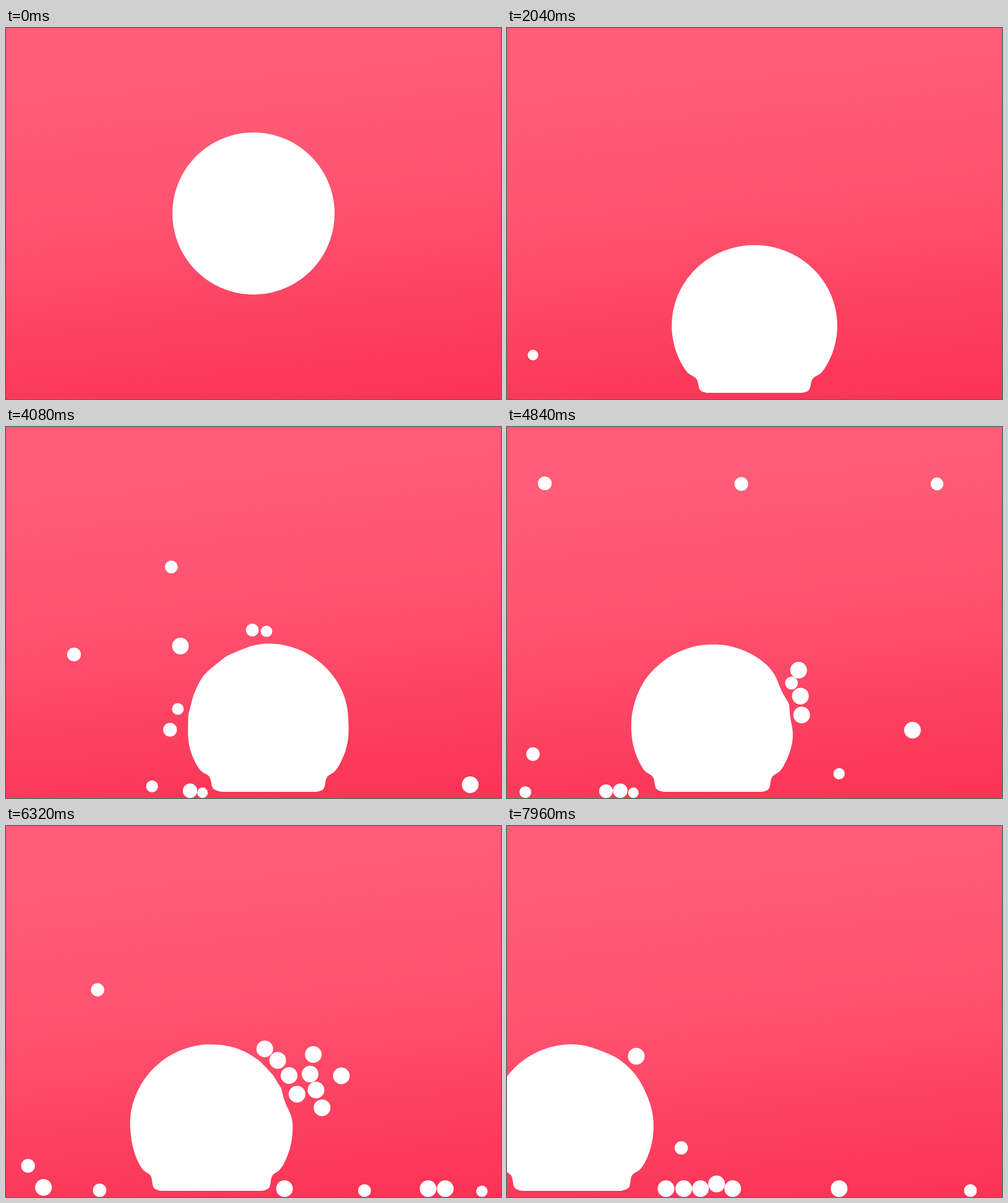
Write an HTML page with a canvas that moves like this. It is 800 px wide and 600 px high and loops after 8000 ms.

```html
<!DOCTYPE html>
<html lang="en">
<head>
<meta charset="utf-8">
<title>Soft blob</title>
<style>
  html, body { margin: 0; height: 100%; overflow: hidden; }
  body { background: linear-gradient(174deg, #ff5d78 14%, #fe5370 48%, #fb3354 98%); }
  canvas { display: block; }
</style>
</head>
<body>
<canvas id="stage" width="800" height="600"></canvas>
<script>
const ctx = document.getElementById('stage').getContext('2d');
const LOOP = 8000, FRAME = 40, STEP = 8, GRAVITY = 0.001;
const FLOOR = 600, REST = 590, LANDING = 564, ROUND = 132;
const SAMPLES = 240, TAU = Math.PI * 2;
const lerp = (a, b, k) => a + (b - a) * k;
const clamp01 = v => Math.max(0, Math.min(1, v));
const bump = (x, width) => Math.exp(-((x / width) ** 2));

let seed = 7;
function random() {
  seed = (seed * 16807) % 2147483647;
  return seed / 2147483647;
}

// Smooth curve through unevenly spaced [x, y] keys.
function curve(keys, x) {
  const last = keys.length - 1;
  if (x <= keys[0][0]) return keys[0][1];
  if (x >= keys[last][0]) return keys[last][1];
  const i = keys.findIndex(k => k[0] > x) - 1;
  const gap = j => keys[j + 1][0] - keys[j][0];
  const rate = j => (keys[j + 1][1] - keys[j][1]) / gap(j);
  const slope = j => j === 0 ? rate(0) : j === last ? rate(last - 1)
    : (rate(j - 1) * gap(j) + rate(j) * gap(j - 1)) / (gap(j) + gap(j - 1));
  const h = gap(i), k = (x - keys[i][0]) / h, k2 = k * k, k3 = k2 * k;
  return (2 * k3 - 3 * k2 + 1) * keys[i][1] + (k3 - 2 * k2 + k) * h * slope(i)
    + (3 * k2 - 2 * k3) * keys[i + 1][1] + (k3 - k2) * h * slope(i + 1);
}

// ---- Blob: a circle that drops, wobbles, drifts and is dented by balls ----
const drift = [[1900, 400], [2040, 400], [2420, 412], [3280, 492], [4840, 332],
  [6320, 332], [7000, 266], [7960, 105]];
const dents = new Float32Array(SAMPLES);

function blobAt(t) {
  const since = Math.max(0, t - LANDING);
  const settle = clamp01(since / 200);
  const sag = 459 + 21 * settle + 5 * clamp01((t - 2040) / 4280);
  return {
    cx: curve(drift, t),
    cy: t < LANDING ? 300 + GRAVITY / 2 * t * t : sag,
    round: lerp(ROUND - 1, ROUND, settle),
    skirt: 5 * settle,
    squash: 0.15 * Math.exp(-since / 700) * Math.sin(since / 99)
  };
}

// Outline radii: circle, rippled next to the floor, minus dents, cut off flat.
function outline({ cy, round, skirt }) {
  const height = REST - cy;
  const corner = Math.asin(Math.min(1, height / round));
  return Array.from(dents, (dent, i) => {
    const sin = Math.sin(i / SAMPLES * TAU);
    const below = Math.asin(sin) - corner;
    const ripple = skirt * (bump(below + 0.09, 0.07) - bump(below + 0.24, 0.08));
    const r = round + ripple - dent;
    return sin > 0 ? Math.min(r, height / sin) : r;
  });
}

// ---- Balls: two launchers throw volleys that fly through given points ----
const LEFT = { x: 42, y: 529, radius: () => 8.5 + random() * 3.5 };
const RIGHT = { x: 752, y: 529, radius: () => 13.5 };
const launches = [];

function volley(side, { count = 1, start, gap = 0, arrive, delay = 0, from, step = [0, 0] }) {
  for (let i = 0; i < count; i++) {
    const time = start + gap * i, flight = arrive + delay * i - time;
    launches.push({
      time, r: side.radius(), x: side.x, y: side.y,
      vx: (from[0] + step[0] * i - side.x) / flight,
      vy: (from[1] + step[1] * i - side.y) / flight - GRAVITY / 2 * flight
    });
  }
}

volley(LEFT, { count: 2, start: 2040, gap: 200, arrive: 2320, delay: 200, from: [262, 480] });
volley(LEFT, { count: 3, start: 2620, gap: 120, arrive: 3280, from: [162, 246], step: [89, 92] });
volley(LEFT, { count: 2, start: 3120, gap: 40, arrive: 3280, from: [116, 442], step: [14, 55] });
volley(LEFT, { count: 3, start: 4100, gap: -210, arrive: 4840, from: [61, 92], step: [317, 0] });
volley(LEFT, { start: 4840, arrive: 5080, from: [190, 500] });
volley(LEFT, { start: 5832, arrive: 6320, from: [148, 265] });

volley(RIGHT, { count: 2, start: 3060, gap: 40, arrive: 3280, from: [651, 403], step: [-16, 74] });
volley(RIGHT, { count: 3, start: 4420, gap: 60, arrive: 4840, from: [445, 408], step: [10, 20] });
volley(RIGHT, { start: 4700, arrive: 4840, from: [658, 491] });
volley(RIGHT, { count: 4, start: 5760, gap: 40, arrive: 6320, from: [417, 363], step: [18, 26] });
volley(RIGHT, { count: 4, start: 5920, gap: 40, arrive: 6320, from: [480, 370], step: [9, 27] });
volley(RIGHT, { start: 6080, arrive: 6320, from: [542, 404] });
volley(RIGHT, { count: 2, start: 6600, gap: 120, arrive: 7000, from: [399, 360], step: [87, 146] });

// The blob's skin acts as a damped spring and remembers how far it was pressed.
function pressBlob(ball, blob, blobSpeed) {
  const dx = ball.x - blob.cx, dy = ball.y - blob.cy, dist = Math.hypot(dx, dy);
  const press = ROUND + ball.r + 8 - dist;
  if (press <= 0) return;
  const nx = dx / dist, ny = dy / dist;
  const closing = (ball.vx - blobSpeed) * nx + ball.vy * ny;
  const push = Math.max(0, 0.0016 * press - 0.05 * closing) * STEP;
  ball.vx += nx * push;
  ball.vy += ny * push;

  const angle = Math.atan2(dy, dx);
  for (let i = 0; i < SAMPLES; i++) {
    const off = i / SAMPLES * TAU - angle;
    const turn = Math.atan2(Math.sin(off), Math.cos(off));
    dents[i] = Math.max(dents[i], Math.min(press, 32) * bump(turn, 0.2));
  }
}

function collide(a, b) {
  const dx = b.x - a.x, dy = b.y - a.y, dist = Math.hypot(dx, dy) || 0.01;
  const overlap = a.r + b.r - dist;
  if (overlap <= 0) return;
  const nx = dx / dist, ny = dy / dist;
  const closing = (a.vx - b.vx) * nx + (a.vy - b.vy) * ny;
  const hit = Math.max(0, closing) * 0.6;
  a.x -= nx * overlap / 2; a.y -= ny * overlap / 2;
  b.x += nx * overlap / 2; b.y += ny * overlap / 2;
  a.vx -= nx * hit; a.vy -= ny * hit;
  b.vx += nx * hit; b.vy += ny * hit;
}

function land(ball) {
  if (ball.y <= FLOOR - ball.r) return;
  ball.y = FLOOR - ball.r;
  if (ball.vy > 0) ball.vy *= -0.3;
}

function advance(balls, t) {
  const blob = blobAt(t), blobSpeed = (blobAt(t + STEP).cx - blob.cx) / STEP;
  for (let i = 0; i < SAMPLES; i++) dents[i] *= Math.exp(-STEP / 600);
  for (const ball of balls) {
    pressBlob(ball, blob, blobSpeed);
    ball.x += ball.vx * STEP;
    ball.y += ball.vy * STEP + GRAVITY / 2 * STEP * STEP;
    ball.vy += GRAVITY * STEP;
  }
  balls.forEach((a, i) => balls.slice(i + 1).forEach(b => collide(a, b)));
  balls.forEach(land);
}

// The whole loop is worked out once, so each picture depends on time alone.
function simulate() {
  const frames = [];
  let balls = [];
  for (let t = 0; t < LOOP; t += STEP) {
    balls.push(...launches.filter(l => l.time >= t && l.time < t + STEP));
    balls = balls.filter(b => b.x > -20 && b.x < 820);
    if (t % FRAME === 0) {
      const blob = blobAt(t);
      frames.push({ blob, radii: outline(blob), balls: balls.map(({ x, y, r }) => ({ x, y, r })) });
    }
    advance(balls, t);
  }
  return frames;
}

function draw({ blob, radii, balls }) {
  ctx.clearRect(0, 0, 800, 600);
  ctx.fillStyle = '#fff';
  ctx.beginPath();
  radii.forEach((r, i) => {
    const angle = i / SAMPLES * TAU;
    const x = blob.cx + r * Math.cos(angle) * (1 + blob.squash);
    const y = blob.cy + r * Math.sin(angle);
    ctx.lineTo(x, REST + (y - REST) * (1 - blob.squash));
  });
  ctx.fill();
  for (const { x, y, r } of balls) {
    ctx.beginPath();
    ctx.arc(x, y, r, 0, TAU);
    ctx.fill();
  }
}

const frames = simulate();
const start = performance.now();
function tick() {
  const t = (performance.now() - start) % LOOP;
  draw(frames[Math.floor(t / FRAME)]);
  requestAnimationFrame(tick);
}
tick();
</script>
</body>
</html>
```
